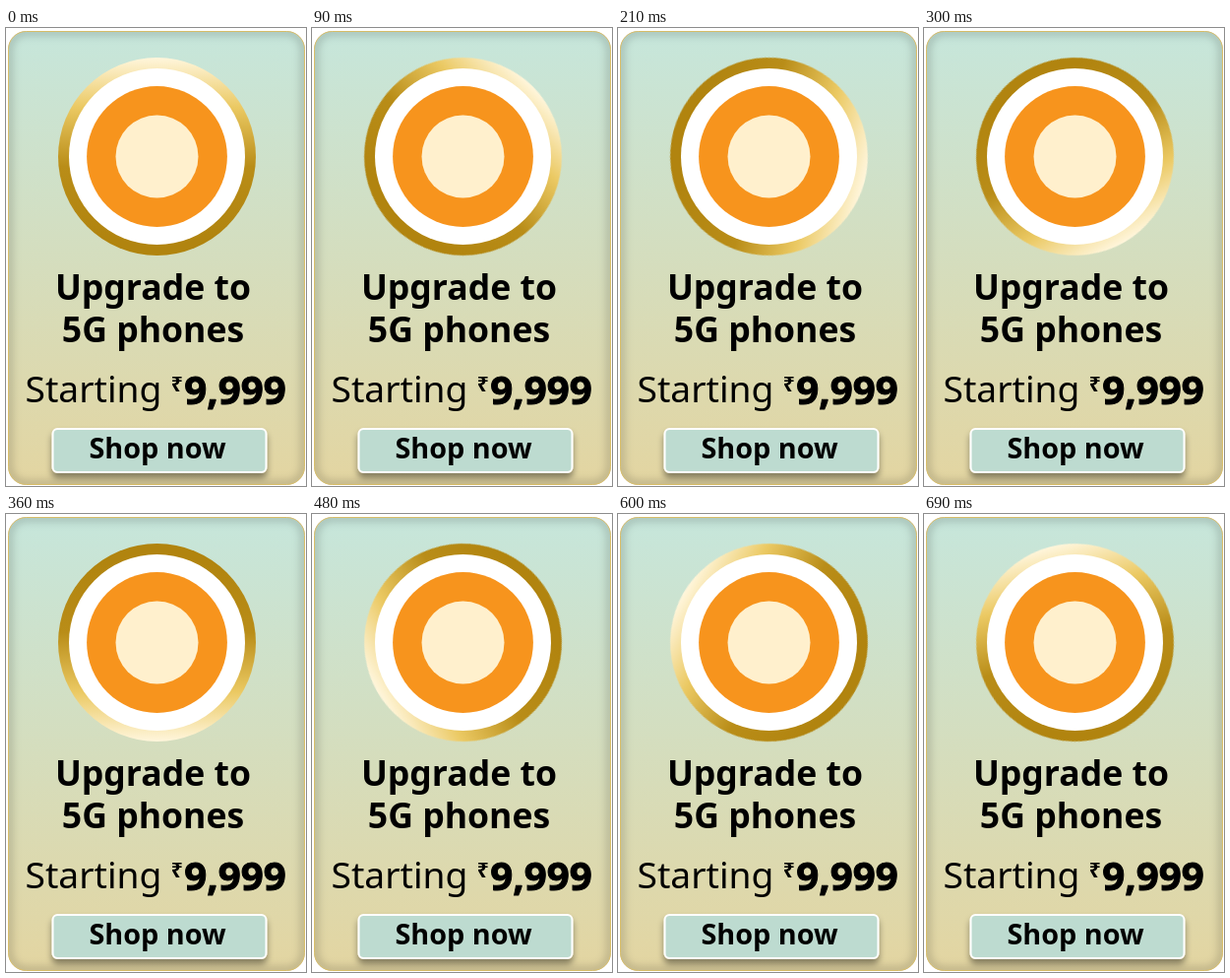
Write an HTML page that moves like this. It is 305 px wide and 465 px high and loops after 720 ms.

```html
<!DOCTYPE html>
<html lang="en">
<head>
<meta charset="utf-8">
<title>5G phones</title>
<style>
  html, body { margin: 0; width: 100%; height: 100%; overflow: hidden; background: #fff; }
  svg { display: block; width: 305px; height: 465px; }
  text { font-family: "Noto Sans", "Open Sans", sans-serif; font-weight: 700; text-anchor: middle; fill: #000; }
  .head { font-size: 35.6px; }
  .light { font-size: 37.2px; font-weight: 400; }
  .price { font-size: 40.2px; stroke: #000; stroke-width: 1; }
  .unit { font-size: 21px; }
  .label { font-size: 28.8px; }
  .ring { transform-origin: 153.5px 130.5px; animation: spin 720ms steps(24) infinite; }
  @keyframes spin { to { transform: rotate(360deg); } }
</style>
</head>
<body>
<svg viewBox="0 0 305 465">
  <defs>
    <linearGradient id="card" x2="0" y2="1">
      <stop stop-color="#c6e6db"/>
      <stop offset="1" stop-color="#e3d5a1"/>
    </linearGradient>
    <linearGradient id="gold" x1="0" y1="1" x2="0" y2="0">
      <stop offset=".1" stop-color="#b1840f"/>
      <stop offset=".45" stop-color="#b98d18"/>
      <stop offset=".75" stop-color="#ebc963"/>
      <stop offset="1" stop-color="#fff6dc"/>
    </linearGradient>
    <clipPath id="edge"><rect x="2" y="3" width="302" height="461" rx="18.5"/></clipPath>
    <filter id="soft"><feGaussianBlur stdDeviation="4"/></filter>
    <filter id="shadow" x="-10%" y="-20%" width="120%" height="160%">
      <feDropShadow dx="0" dy="5" stdDeviation="3" flood-color="#000" flood-opacity=".4"/>
    </filter>
  </defs>

  <rect x="2.5" y="3.5" width="301" height="460" rx="18" fill="url(#card)"/>
  <g clip-path="url(#edge)">
    <rect x="2.5" y="3.5" width="301" height="460" rx="18" fill="none" stroke="#000" stroke-opacity=".18" stroke-width="8" filter="url(#soft)"/>
  </g>
  <rect x="2.5" y="3.5" width="301" height="460" rx="18" fill="none" stroke="#d8bd68"/>

  <circle class="ring" cx="153.5" cy="130.5" r="100.5" fill="url(#gold)"/>
  <circle cx="153.5" cy="130.5" r="89.5" fill="#fff"/>
  <circle cx="153.5" cy="130.5" r="71.4" fill="#f7941d"/>
  <circle cx="153.5" cy="130.5" r="42" fill="#fff0cd"/>

  <text class="head" x="149.5" y="276">Upgrade to</text>
  <text class="head" x="149.5" y="319">5G phones</text>
  <text class="light" x="89" y="380">Starting</text>
  <text class="unit" x="173.7" y="369">₹</text>
  <text class="price" x="233" y="382">9,999</text>

  <rect x="47.5" y="407" width="217" height="44" rx="5" fill="#bddbd0" stroke="#fff" stroke-width="2" filter="url(#shadow)"/>
  <text class="label" x="154" y="437">Shop now</text>
</svg>
</body>
</html>
```
